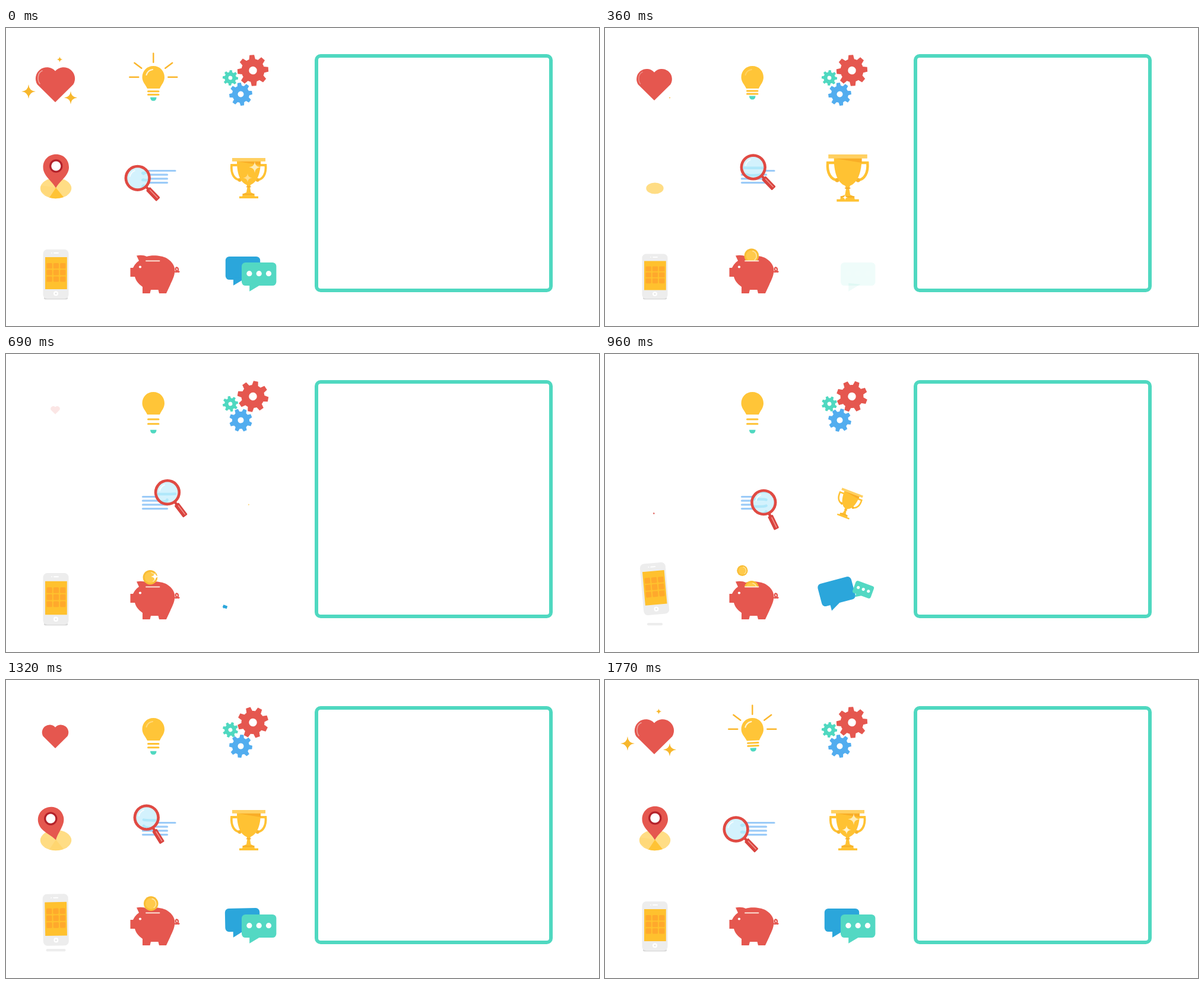
Recreate the animation shown at these times as an HTML page with a canvas. Size 999x502 px, loop 1.8 s.

```html
<!DOCTYPE html>
<html lang="en">
<head>
<meta charset="utf-8">
<title>Icon loop</title>
<style>
html, body { margin: 0; width: 100%; height: 100%; overflow: hidden; background: #fff; }
canvas { display: block; }
</style>
</head>
<body>
<canvas id="stage" width="999" height="502"></canvas>
<script>
const c = document.getElementById('stage').getContext('2d');
const LOOP = 1800, STEP = 30, RAD = Math.PI / 180;
const RED = '#e5574f', GOLD = '#ffc233', TEAL = '#4fd8c0', BLUE = '#2ba6db', WHITE = '#fff';
let t = 0;

// Progress helpers: linear, eased, out and back, single swell.
const lin = (a, b) => Math.min(1, Math.max(0, (t - a) / (b - a)));
const ramp = (a, b) => { const p = lin(a, b); return p * p * (3 - 2 * p); };
const away = (a, b, back, end) => ramp(a, b) - ramp(back, end);
const bump = (a, b) => Math.sin(Math.PI * lin(a, b));
const wave = (period, peak) => Math.cos(2 * Math.PI * (t - peak) / period);

function fill(path, color) {
  c.fillStyle = color;
  c.fill(new Path2D(path));
}

function line(path, color, width, cap = 'round') {
  c.strokeStyle = color;
  c.lineWidth = width;
  c.lineCap = cap;
  c.stroke(new Path2D(path));
}

function oval(x, y, rx, color, ry = rx) {
  c.fillStyle = color;
  c.beginPath();
  c.ellipse(x, y, rx, ry, 0, 0, 7);
  c.fill();
}

function box(x, y, w, h, r, color) {
  c.fillStyle = color;
  c.beginPath();
  c.roundRect(x, y, w, h, r);
  c.fill();
}

function group(alpha, draw) {
  if (alpha <= 0) return;
  c.save();
  c.globalAlpha *= alpha;
  draw();
  c.restore();
}

// Turn and scale around a pivot, which becomes the local origin.
function at(x, y, deg, sx, sy, draw) {
  if (Math.abs(sx) < .001) return;
  group(1, () => {
    c.translate(x, y);
    c.rotate(deg * RAD);
    c.scale(sx, sy);
    draw();
  });
}

// As above, but the drawing keeps stage coordinates.
function around(x, y, deg, s, draw) {
  at(x, y, deg, s, s, () => { c.translate(-x, -y); draw(); });
}

function sparkle(x, y, r, color) {
  at(x, y, 0, r, r, () => fill('M0-1Q.08-.08 1 0Q.08.08 0 1Q-.08.08-1 0Q-.08-.08 0-1Z', color));
}

function heart() {
  group(1 - .87 * away(360, 720, 1000, 1170), () =>
    around(83, 94.5, 0, 1 - away(230, 900, 1110, 1450), () => {
      fill('M83 125L52.6 95A19 19 0 0 1 83 72.5A19 19 0 0 1 113.4 95Z', RED);
      group(1 - away(240, 600, 1450, 1740), () => line('M61 72C52 76 53 89 57 94', '#f0a09a', 1.6));
    }));
  const gold = '#f7b72d';
  sparkle(90.5, 53, 5 * (1 - away(0, 120, 1380, 1500)) + 4 * bump(1380, 1740), gold);
  sparkle(38, 107, 12 * (1 - away(90, 300, 1530, 1680)), gold);
  sparkle(109, 117.5, 11 * (1 - away(150, 420, 1560, 1710)), gold);
}

function bulb() {
  const gap = 8 * away(400, 630, 1080, 1500) + 2 * bump(-60, 200);
  around(248.3, 82, 5 * bump(1080, 1260) - 3 * bump(1650, 1830), 1, () => {
    fill('M248.3 64C259 64 267 72 267 83C267 91 262 95 259 102H238C235 95 229.5 91 229.5 83C229.5 72 237.5 64 248.3 64Z', '#ffc538');
    group(1 - away(100, 500, 1170, 1500), () => line('M236.5 79A13 13 0 0 1 247 70', '#fff4d2', 2.2));
    line(`M239.5 ${106 + gap * .5}h17.5M239.5 ${111 + gap * .85}h17.5`, GOLD, 3);
    fill(`M243 ${114.5 + gap * 1.65}h10.5q0 6-5.2 6t-5.3-6Z`, TEAL);
  });
  const late = t > 1500;
  const near = late ? 0 : ramp(40, 240), far = late ? ramp(1500, 1680) : 1;
  if (far > near)
    for (const deg of [0, 37, 90, 143, 180])
      at(248.3, 82.8, -deg, 1, 1, () => line(`M${25 + 15 * near} 0H${25 + 15 * far}`, '#fbb62b', 2.4));
}

function gear(x, y, r, deg, color) {
  at(x, y, deg, r, r, () => {
    oval(0, 0, .75, color);
    for (let i = 0; i < 8; i++) {
      c.rotate(Math.PI / 4);
      fill('M.6-.22L1-.15V.15L.6.22Z', color);
    }
    oval(0, 0, .26, WHITE);
  });
}

function gears() {
  const turn = 24 * ramp(400, 900) + 21 * ramp(1170, 1560) - 4;
  gear(416, 71.5, 26, turn, RED);
  gear(378, 84, 13, -turn, TEAL);
  gear(395.5, 111.5, 19.3, -12 - turn, '#52adef');
}

function pin() {
  const pad = 1 - away(240, 500, 1000, 1220);
  at(84, 270, 0, pad, pad, () => {
    oval(0, 0, 26.3, '#ffdd85', 17.2);
    group(1 - away(0, 240, 1230, 1500), () => {
      fill('M0-1L-11 15.6Q0 19 13 15Z', '#ffc335');
      fill('M0-1L-25-5V5L-11 15.6Z', '#ffd97a');
    });
  });
  const lean = t < 600 ? 0 : -75 * (1 - lin(960, 1600)) ** 2;
  around(84, 269, lean, 1 - away(60, 300, 940, 1080), () => {
    fill('M84 269.5C77 257 62.5 249 62.5 234.5C62.5 222 72 212.8 84.3 212.8C97 212.8 106 222 106 234.5C106 249 91 257 84 269.5Z', RED);
    oval(84.3, 232.5, 11.2, '#b3222a');
    oval(84.3, 232.5, 8, WHITE);
  });
}

function search() {
  const rows = [0, 1, 2, 3].map(i => [240.5 + i * 6.7, i ? 271.5 : 285]);
  for (const [y, end] of rows) line(`M230.5 ${y}H${end}`, '#9bcbf8', 3.2);
  // The lens sweeps sideways once and bobs twice per loop.
  const sway = wave(LOOP, 770);
  const x = 246 + 27 * sway, y = 240 - 2.5 * sway + 12 * wave(LOOP / 2, 70);
  at(x, y, 46 + 18 * away(500, 960, 1170, 1560), 1, 1, () => {
    line('M20 0H30', '#d9443f', 4.5);
    box(25, -4.6, 25, 9.2, 1.5, '#d9443f');
    line('M29 -1H47', '#f3958f', 1.6);
  });
  oval(x, y, 22.2, '#e04a43');
  oval(x, y, 17.5, '#d3f2fd');
  group(.75, () => {
    c.beginPath();
    c.arc(x, y, 17.5, 0, 7);
    c.clip();
    for (const [row, end] of rows) {
      const big = 250.5 + (row - 250.5) * 1.5;
      line(`M232 ${big}Q${x} ${big + (big - y) * .5} ${end} ${big}`, '#a4e4fa', 4.5);
    }
  });
  line(`M${x - 13} ${y - 3}A13.5 13.5 0 0 1 ${x - 5} ${y - 12.5}`, '#f2fcff', 2.2);
}

function trophy() {
  const size = 1 + .17 * bump(120, 600) - .97 * away(360, 700, 740, 1100);
  const turn = 40 * away(600, 700, 780, 1150) - 3 * bump(1080, 1300);
  around(408.7, 254, turn, size, () => {
    for (const side of [1, -1])
      at(408.7, 0, 0, side, 1, () => {
        line('M-19 231H-28.7C-30 246-24 255-15 256', GOLD, 3.8, 'butt');
        oval(-15, 256, 3, '#f7b52e');
      });
    fill('M389 224H429C429 243 424 262 408.7 265C393 262 389 243 389 224Z', GOLD);
    fill('M389 224.5H429V231Q411 228 389 224.5Z', '#f9ad27');
    box(381, 219, 56, 5.7, 0, '#ffd061');
    fill('M405 263H412.5L411 268L412.5 277L418 279.5L419 283.5H425V287H393V283.5H398L399 279.5L405 277L406.5 268Z', GOLD);
    line('M405.5 267.5h6.5M399 280h19', '#f2a928', 1.6);
    sparkle(419, 234.5, 9.5 * (1 - away(0, 210, 1560, 1710)), '#ffebb5');
    group(t > 900 ? 1 : .55, () => sparkle(407, 252.5, 7.5 * (1 - away(0, 120, 1590, 1740)), '#fff3cf'));
    sparkle(410, 247, 5.5 * bump(1080, 1260), WHITE);
    sparkle(405, 281, 4 * bump(300, 420), WHITE);
  });
}

function phone() {
  const h = 83 - 8 * bump(90, 540) + 4 * away(500, 690, 1500, 1800);
  const lift = away(690, 930, 1200, 1440);
  box(64 + lift * 7, 453, 40 - lift * 14, 4.2, 2, lift ? '#ededed' : '#d8d8d8');
  at(84 - lift * .5, 456 - lift * 17 - h / 2, -5 * away(780, 930, 1000, 1440), 1, h / 83, () => {
    box(-21.5, -41.5, 43, 83, 7, '#ededed');
    box(-18, -28.5, 36.8, 54, 0, '#ffc12e');
    for (let i = 0; i < 9; i++)
      box(-15.5 + i % 3 * 11.3, -18.5 + (i / 3 | 0) * 11.2, 9.3, 9.2, 1.5, '#ffa92c');
    line('M-3-35.5H4', WHITE, 1.8);
    oval(-7, -35.5, .9, WHITE);
    oval(0, 32.7, 4, WHITE);
    box(-1.3, 31.4, 2.6, 2.6, .5, '#e4e4e4');
  });
}

// A coin rises out of the slot, then drifts off to the left and shrinks.
function coin(start) {
  const p = lin(start, start + 840);
  if (p === 0 || p === 1) return;
  const x = 247 - 22 * p ** 3;
  const y = 377 + 27 * (1 - lin(start, start + 300)) ** 2 - 24 * p ** 6;
  const size = 1 - p ** 12;
  group(1, () => {
    c.beginPath();
    c.rect(200, 340, 100, 52);
    c.clip();
    at(x, y, 0, size, size, () => {
      oval(0, 0, 12.3, '#f9bd35');
      oval(0, 0, 9.3, '#ffca4b');
      line('M2-8A8.5 8.5 0 0 1 5 7', '#ffe6a3', 1.6);
    });
  });
}

function pig() {
  fill('M237 385C246 382 262 383 271 388C281 394 286 403 284 413C283 420 279 427 277 432L270 447H258L256.5 441H244L242.5 447H230V436C223 431 219 426 217 419H209.5V404H214C217 398 220 395 224 392L220 383.5C227 382 233 383 237 385Z', RED);
  line('M283 410C291 414 292 403 287 403.5C284 405 287 412 291.5 410.5', RED, 2.4);
  oval(226, 402.5, 2.1, WHITE);
  coin(210);
  coin(900);
  sparkle(251, 375, 7 * bump(600, 780), WHITE);
  sparkle(234, 384, 5.5 * bump(1410, 1590), '#fff0c4');
  line('M236 392.3H258.5', '#fff0e4', 1.8);
}

function bubble(color) {
  box(-29.2, -19.8, 58.4, 39.2, 6.5, color);
  fill('M-16 15V29L4 17Z', color);
}

function chat() {
  const fresh = t > 450;
  const s = fresh ? ramp(630, 900) : 1, lean = -15 * away(660, 930, 930, 1400);
  group(fresh ? 1 : 1 - ramp(90, 330), () =>
    at(365 + 34 * s + lean * .6, 429 - 24.3 * s + lean * .3, 25 * (1 - s) + lean, s, s, () => bubble(BLUE)));
  const g = fresh ? ramp(820, 1080) : 1;
  group(fresh ? 1 : 1 - ramp(100, 420), () =>
    at(446.2 - 20 * g, 374.7 + 40 * g, 45 * (1 - g), g, g, () => {
      bubble('#53d8c3');
      for (let i = -1; i < 2; i++)
        oval(i * 16.3, -1 - 3.2 * (i + 1) * bump(1080, 1260), 4.6, WHITE);
    }));
}

function frame(now) {
  t = Math.floor(now % LOOP / STEP) * STEP;
  c.fillStyle = WHITE;
  c.fillRect(0, 0, 999, 502);
  for (const draw of [heart, bulb, gears, pin, search, trophy, phone, pig, chat]) draw();
  c.strokeStyle = TEAL;
  c.lineWidth = 6;
  c.beginPath();
  c.roundRect(523, 47, 395, 395, 7);
  c.stroke();
  requestAnimationFrame(frame);
}
frame(0);
</script>
</body>
</html>
```
